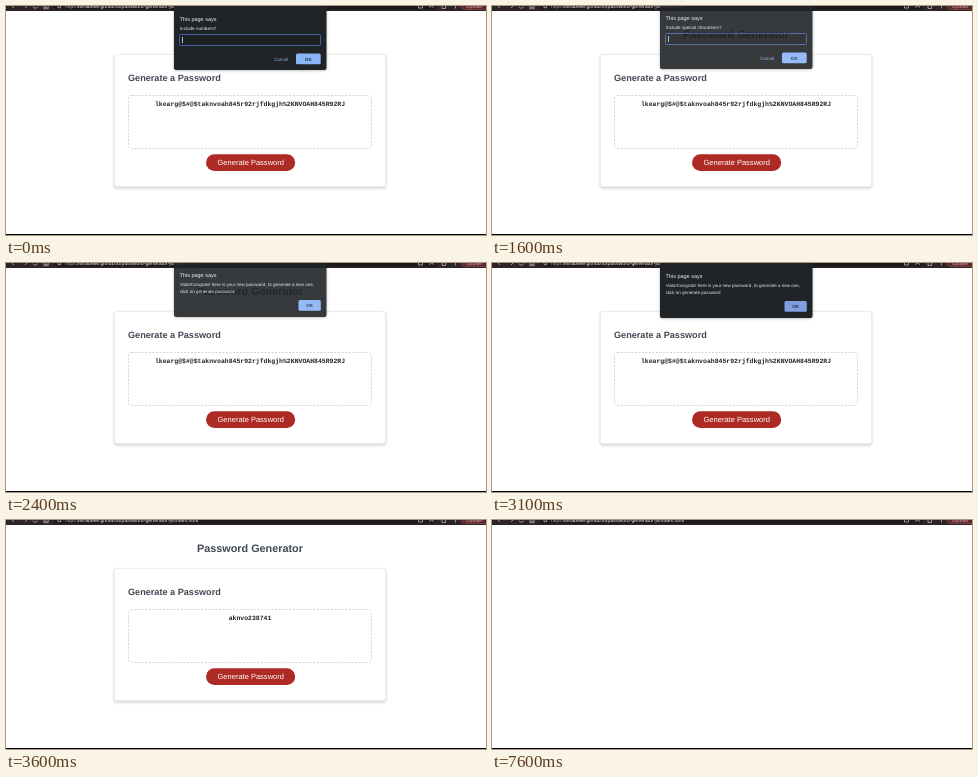
An HTML page that plays this animation: 480 by 229 pixels, repeating every 8000 ms.

```html
<!DOCTYPE html>
<html lang="en">
<head>
<meta charset="utf-8">
<title>Password Generator</title>
<style>
  html, body { margin: 0; width: 100%; height: 100%; overflow: hidden; background: #fff; }
  svg { display: block; width: 100%; height: 100%; }
  text { font-family: "Liberation Sans", Arial, sans-serif; text-rendering: geometricPrecision; }
  .heading { font-weight: bold; fill: #414853; }
  .password { font: bold 6.47px "Liberation Mono", "Courier New", monospace; text-anchor: middle; fill: #222; }
  .head { font-size: 5.5px; fill: #eceded; }
  .msg { font-size: 4.6px; fill: #e6e7e8; }
  .ok { fill: #8ab4f8; }
  .ok-text { font-size: 4.6px; font-weight: bold; text-anchor: middle; fill: #26314a; }

  /* 1.25% of the loop is 100 ms */
  .page, .old, .new, .dialog, .caret, .ok { animation: 8s step-end infinite; }
  .page { animation-name: page; }
  .old { animation-name: old; }
  .new { animation-name: new; }
  #numbers { animation-name: numbers; }
  #special { animation-name: special; }
  #done { animation-name: done; }
  #numbers .caret { animation-name: caret-numbers; }
  #special .caret { animation-name: caret-special; }
  #numbers .ok { animation-name: press-numbers; }
  #special .ok { animation-name: press-special; }
  #done .ok { animation-name: press-done; }

  @keyframes page { 0% { opacity: 1 } 91.25%, 100% { opacity: 0 } }
  @keyframes old { 0% { opacity: 1 } 42.5%, 100% { opacity: 0 } }
  @keyframes new { 0% { opacity: 0 } 42.5%, 100% { opacity: 1 } }

  @keyframes numbers {
    0% { opacity: 1; transform: none }
    18.75% { opacity: .42; transform: translateY(-3.5px) }
    20%, 100% { opacity: 0; transform: none }
  }
  @keyframes special {
    0% { opacity: 0; transform: none }
    18.75% { opacity: .42; transform: translateY(-5px) }
    20% { opacity: .9; transform: translateY(-1px) }
    21.25% { opacity: 1; transform: none }
    28.75% { opacity: .42; transform: translateY(-3.5px) }
    30%, 100% { opacity: 0; transform: none }
  }
  @keyframes done {
    0% { opacity: 0; transform: none }
    28.75% { opacity: .42; transform: translateY(-5px) }
    30% { opacity: .9; transform: translateY(-1px) }
    31.25% { opacity: 1; transform: none }
    41.25% { opacity: .9; transform: translateY(-1px) }
    42.5% { opacity: .42; transform: translateY(-3.5px) }
    43.75% { opacity: .1; transform: translateY(-5px) }
    45%, 100% { opacity: 0; transform: none }
  }
  @keyframes caret-numbers {
    0% { opacity: 1 } 3.75% { opacity: 0 } 10% { opacity: 1 } 16.25%, 100% { opacity: 0 }
  }
  @keyframes caret-special { 0% { opacity: 1 } 27.5%, 100% { opacity: 0 } }
  @keyframes press-numbers { 0% { fill: #8ab4f8 } 15%, 100% { fill: #7089bd } }
  @keyframes press-special { 0% { fill: #8ab4f8 } 25%, 100% { fill: #7089bd } }
  @keyframes press-done { 0% { fill: #8ab4f8 } 38.75%, 100% { fill: #7f9fe0 } }
</style>
</head>
<body>
<svg viewBox="0 0 480 229" preserveAspectRatio="none">
  <defs>
    <filter id="soft" x="-10%" y="-10%" width="120%" height="125%">
      <feGaussianBlur stdDeviation="1.6"/>
    </filter>
    <g id="prompt">
      <rect x="168" y="-10" width="152.5" height="74.5" rx="2" fill="#000" opacity=".3" filter="url(#soft)"/>
      <rect x="168" y="-10" width="152.5" height="74" rx="2" fill="#202427"/>
      <text class="head" x="173.5" y="14.5">This page says</text>
      <rect x="173.5" y="28.5" width="141" height="11" rx="1" fill="#1d2023" stroke="#425f9f"/>
      <text x="268" y="54.6" font-size="4.6" fill="#8ba9dc">Cancel</text>
    </g>
  </defs>

  <rect width="480" height="229" fill="#fff"/>

  <g id="toolbar">
    <rect width="480" height="5" fill="#2c2426"/>
    <rect x="48" y="-6" width="383" height="9.5" rx="4" fill="#1e1a1c"/>
    <g fill="none" stroke="#b5b0b1" stroke-width=".8">
      <path d="M6 0l2 2M19 2l2-2M27 .5a2.4 2.4 0 0 0 4.6 0M38 0v2.8h1.4V1h1.4v1.8h1.4V0"/>
      <path d="M52 0v1.7h2.6V0M412.500 0v2h4V0M423 1.500l2.500-1.500 2.500 1.500M436 0v2.500h3.500V0M449.500 0v2.500"/>
    </g>
    <text x="59" y="1.700" font-size="5" fill="#a9a4a5">https://</text>
    <text x="72" y="1.800" font-size="5.200" fill="#e8e5e5">mirabelle.github.io/password-generator-js/index.html</text>
    <rect x="455" y="-6" width="30" height="9.500" rx="4" fill="#5a2a2d" stroke="#a04a4a" stroke-width=".6"/>
    <text x="460" y="1.700" font-size="5" fill="#e0a09b">Update</text>
  </g>

  <g class="page">
    <text class="heading" x="191" y="32.300" font-size="10.840">Password Generator</text>
    <rect x="108" y="49.500" width="272" height="133" rx="2" fill="#000" opacity=".17" filter="url(#soft)"/>
    <rect x="108.500" y="48.500" width="271" height="132" rx="2" fill="#fff" stroke="#e7e7e7" stroke-width=".7"/>
    <text class="heading" x="122" y="75" font-size="9.140">Generate a Password</text>
    <rect x="122.500" y="89.500" width="243" height="53" rx="3" fill="none" stroke="#c9c9c9" stroke-width=".8" stroke-dasharray="2 1.500"/>
    <text class="password old" x="244" y="100.300">lkearg@$#@$taknvoah845r92rjfdkgjh%2KNVOAH845R92RJ</text>
    <text class="password new" x="244" y="100.300">aknvo238741</text>
    <rect x="200" y="148.300" width="89.200" height="16.700" rx="8.350" fill="#ae2a25"/>
    <text x="211.500" y="159.300" font-size="7.520" fill="#fff">Generate Password</text>
  </g>

  <g id="numbers" class="dialog">
    <use href="#prompt"/>
    <text class="msg" x="173.800" y="24.300">Include numbers?</text>
    <rect class="caret" x="176" y="31" width=".8" height="6" fill="#dfe3ea"/>
    <rect class="ok" x="290" y="47.500" width="24.700" height="10.800" rx="1.500"/>
    <text class="ok-text" x="302.300" y="54.600">OK</text>
  </g>

  <g id="special" class="dialog">
    <use href="#prompt"/>
    <text class="msg" x="173.800" y="24.300">Include special characters?</text>
    <rect class="caret" x="176" y="31" width=".8" height="6" fill="#dfe3ea"/>
    <rect class="ok" x="290" y="47.500" width="24.700" height="10.800" rx="1.500"/>
    <text class="ok-text" x="302.300" y="54.600">OK</text>
  </g>

  <g id="done" class="dialog">
    <rect x="168" y="-10" width="152.500" height="65.500" rx="2" fill="#000" opacity=".3" filter="url(#soft)"/>
    <rect x="168" y="-10" width="152.500" height="65" rx="2" fill="#202427"/>
    <text class="head" x="173.500" y="14.500">This page says</text>
    <text class="msg" x="173.800" y="24.300" style="font-size:4.53px">Voila!Congrats! here is your new password, to generate a new one,</text>
    <text class="msg" x="173.800" y="31.200" style="font-size:4.53px">click on generate password</text>
    <rect class="ok" x="292.500" y="38" width="22.300" height="10.800" rx="1.500"/>
    <text class="ok-text" x="303.600" y="45.100">OK</text>
  </g>

  <rect y="228" width="480" height="1" fill="#000"/>
</svg>
</body>
</html>
```
